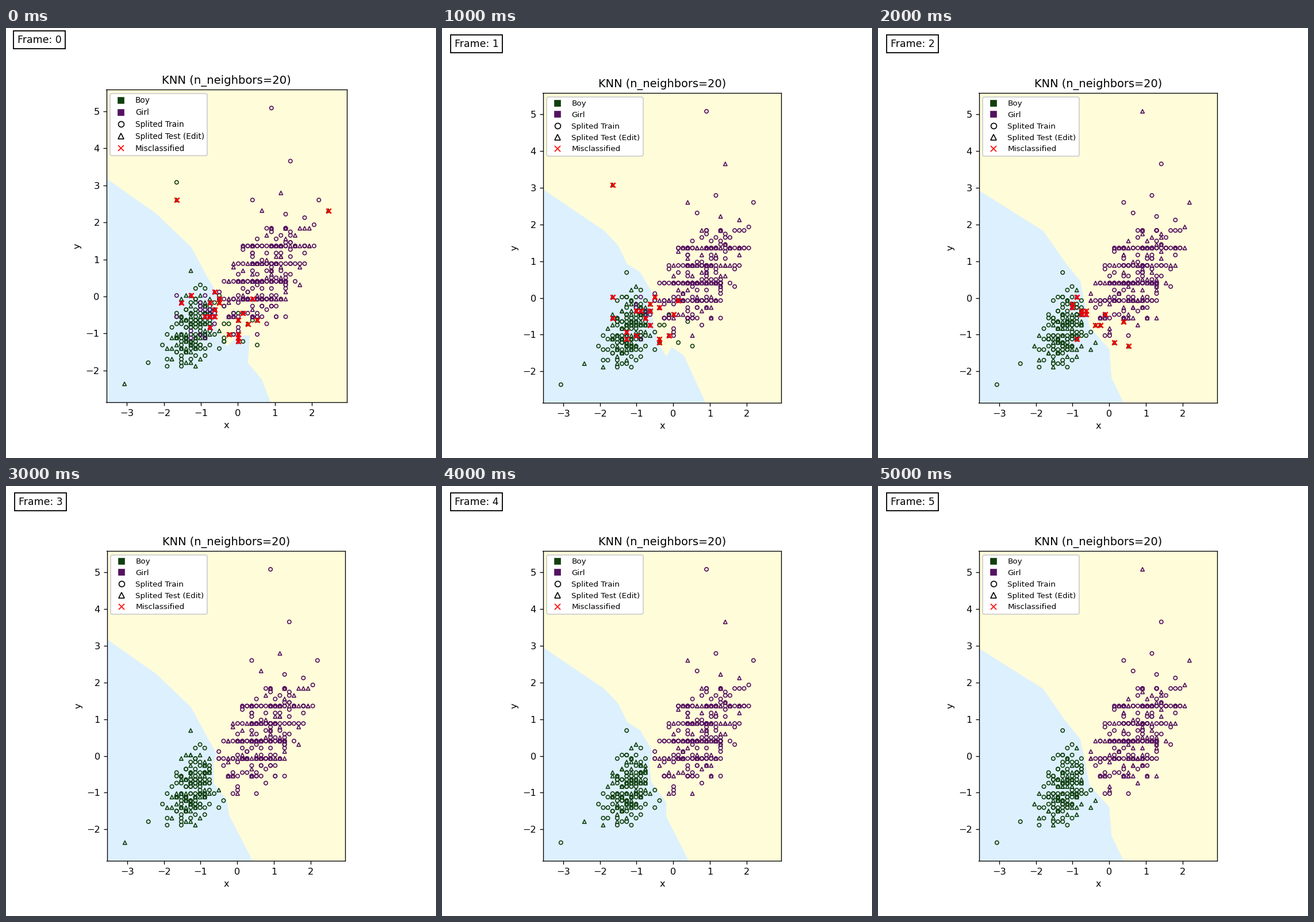
Write a matplotlib script that moves like this. It is 748x748 px and loops after 6 s.

```python
import random
import matplotlib.pyplot as plt
from matplotlib.animation import FuncAnimation
from matplotlib.lines import Line2D
from matplotlib.patches import Rectangle
from matplotlib.path import Path

SIZE, DPI = 748, 120
BOY, GIRL = "#103f0e", "#54125f"
BLUE, CREAM = "#ddf0fe", "#fffcd9"
XLIM, YLIM = (-3.553, 2.943), (-2.857, 5.584)
BASE_FONT = 9.8
plt.rcParams["font.family"] = "DejaVu Sans"
rng = random.Random(8)

# Key points of the decision boundary: the upper part depends on the test
# fold, the lower part on how far the editing has gone.
UPPER = [
    [(-3.56, 3.19), (-2.2, 2.23), (-1.26, 1.33), (-.79, .46), (-.55, .05), (-.65, -.2)],
    [(-3.56, 2.97), (-1.88, 1.83), (-1.5, 1.43), (-1.26, .93), (-.9, .7), (-.55, .1),
     (-.65, -.2)],
    [(-3.56, 2.94), (-2.2, 2.08), (-1.8, 1.83), (-1.21, .98), (-.79, .46), (-.65, -.2)],
]
FOLD2_LOWER = [(-.54, -.79), (0, -1.39), (.06, -2.17), (.39, -2.86)]
LOWER = [
    [(-.58, -.85), (-.3, -1.35), (0, -1.07), (.32, -1.05), (.27, -1.79), (.65, -2.25),
     (.88, -2.86)],
    [(-.54, -.63), (-.41, -1.23), (-.19, -1.59), (-.04, -1.34), (.29, -1.57),
     (.88, -2.86)],
    FOLD2_LOWER,
    [(-.63, -.76), (-.29, -1.18), (-.22, -1.62), (.42, -2.86)],
    [(-.6, -.71), (-.19, -1.26), (-.19, -1.65), (.42, -2.86)],
    FOLD2_LOWER,
]
REGIONS = [Path(UPPER[n % 3] + LOWER[n] + [(-3.56, -2.86)]) for n in range(6)]

# Lone cells (column, row, fold) far from the clusters.
GIRL_FAR = [(7, 54, 2), (11, 39, 1), (9, 30, 0), (17, 28, 2), (3, 28, 1), (5, 25, 0)]
BOY_FAR = [(-24, -24, 0), (-19, -18, 1), (-10, 8, 0)]
WRONG_FAR = [[(-13, 28), (19, 25)], [(-13, 33)], [(4, -13)]]
WRONG_COUNT = (22, 19, 14)


def spot(col, row):
    """Measurements are rounded, so samples sit on a lattice."""
    return .01 + .128 * col, -.07 + .0955 * row


def draw_cell(mean, spread, slope, cols, rows, snap=0):
    """One normal, correlated cell inside the given column and row limits."""
    while True:
        u, v = rng.gauss(0, 1), rng.gauss(0, 1)
        col = round(mean[0] + spread[0] * u)
        row = round(mean[1] + spread[1] * (slope * u + (1 - slope ** 2) ** .5 * v))
        if rng.random() < snap:
            row = 5 * round(row / 5)
        if cols[0] <= col <= cols[1] and rows[0] <= row <= rows[1]:
            return col, row


def cluster(colour, count, **shape):
    """Samples which stay on their own side of every final boundary."""
    out = []
    while len(out) < count:
        cell = draw_cell(**shape)
        if all(r.contains_point(spot(*cell)) == (colour == BOY) for r in REGIONS[3:]):
            out.append((*cell, colour, rng.randrange(3), 5))
    return out


def strays(step):
    """Samples on the wrong side, edited away after their step."""
    cells = list(WRONG_FAR[step])
    while len(cells) < WRONG_COUNT[step]:
        cell = draw_cell((-4, -5), (4, 4.5), -.2, (-14, 6), (-12, 2))
        if cell not in cells:
            cells.append(cell)
    return [(*c, GIRL if REGIONS[step].contains_point(spot(*c)) else BOY, step, step)
            for c in cells]


# Each sample: column, row, colour, test fold, last step it is seen.
SAMPLES = [(*c[:2], GIRL, c[2], 5) for c in GIRL_FAR]
SAMPLES += [(*c[:2], BOY, c[2], 5) for c in BOY_FAR]
SAMPLES += cluster(GIRL, 290, mean=(5, 5.5), spread=(4.5, 8.5), slope=.55,
                   cols=(-6, 17), rows=(-10, 24), snap=.55)
SAMPLES += cluster(BOY, 160, mean=(-9.5, -8), spread=(3.4, 5.5), slope=.4,
                   cols=(-16, -2), rows=(-19, 7))
STRAYS = [strays(step) for step in range(3)]
SAMPLES += sum(STRAYS, [])


def scatter(ax, samples, **style):
    ax.scatter(*zip(*(spot(*s[:2]) for s in samples)), **style)


def handle(marker, edge, face="none"):
    return Line2D([], [], ls="", marker=marker, ms=5.9, mec=edge, mfc=face, mew=1)


def draw_label(n):
    x, top = (13, 5) if n == 0 else (15, 12)
    fig.add_artist(Rectangle((x / SIZE, 1 - (top + 31) / SIZE), 90 / SIZE, 31 / SIZE,
                             transform=fig.transFigure, fc="white", ec="black", lw=1.1))
    fig.text((x + 45) / SIZE, 1 - (top + 21.3) / SIZE, f"Frame: {n}",
             fontsize=10.4, ha="center", va="baseline")


def draw_samples(ax, n):
    alive = [s for s in SAMPLES if n <= s[4]]
    for colour in (BOY, GIRL):
        for marker, test in (("o", False), ("^", True)):
            group = [s for s in alive if s[2] == colour and (s[3] == n % 3) == test]
            scatter(ax, group, s=14.4, marker=marker, fc="none", ec=colour, lw=1, zorder=2)
    if n < len(STRAYS):
        scatter(ax, STRAYS[n], s=25, marker="x", c="red", lw=1.5, zorder=3)


def draw_legend(ax):
    marks = [handle("s", BOY, BOY), handle("s", GIRL, GIRL), handle("o", "black"),
             handle("^", "black"), handle("x", "red")]
    names = ["Boy", "Girl", "Splited Train", "Splited Test (Edit)", "Misclassified"]
    ax.legend(marks, names, loc="upper left", fontsize="small", framealpha=1)


def update(n):
    fig.clear()
    scale, left, bottom = (64.42, 174.5, 651) if n == 0 else (63.83, 175.5, 652)
    plt.rcParams["font.size"] = BASE_FONT * scale / 64.42
    w, h = (scale * (hi - lo) / SIZE for lo, hi in (XLIM, YLIM))
    ax = fig.add_axes([left / SIZE, 1 - bottom / SIZE, w, h], facecolor=CREAM)

    draw_label(n)
    ax.fill(*REGIONS[n].vertices.T, color=BLUE, lw=0, zorder=0)
    draw_samples(ax, n)
    ax.set(xlim=XLIM, ylim=YLIM, xlabel="x", ylabel="y",
           xticks=range(-3, 3), yticks=range(-2, 6), title="KNN (n_neighbors=20)")
    draw_legend(ax)
    return []


fig = plt.figure(figsize=(SIZE / DPI, SIZE / DPI), dpi=DPI, facecolor="white")
anim = FuncAnimation(fig, update, frames=6, interval=1000, init_func=lambda: update(0),
                     repeat=True, repeat_delay=0)
plt.show()
```
